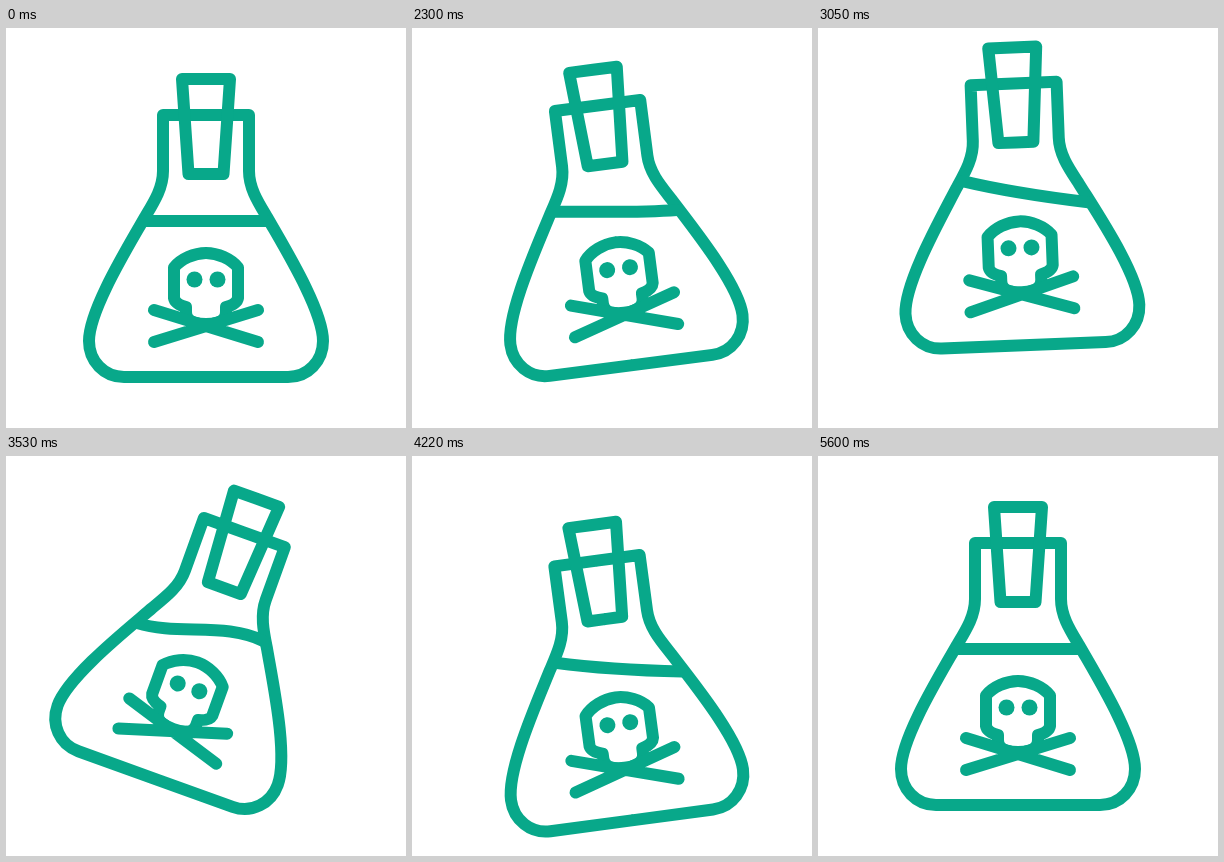
These frames come from a looping animation (400 px wide and 400 px high, 5.63 s). An HTML page with a canvas:

```html
<!DOCTYPE html>
<html lang="en">
<head>
<meta charset="utf-8">
<title>Poison flask</title>
<style>
  html, body { margin: 0; width: 100%; height: 100%; overflow: hidden; background: #fff; }
  canvas { display: block; }
</style>
</head>
<body>
<canvas id="stage" width="400" height="400"></canvas>
<script>
const ctx = document.getElementById('stage').getContext('2d');
const LOOP = 5630, REST = 2030, STEP = 30;
const COLOR = '#08a88a';

// Every shape is its left half plus the reflection about x = 200.
function mirrored(half) {
  const path = new Path2D(half);
  path.addPath(new Path2D(half), new DOMMatrix([-1, 0, 0, 1, 400, 0]));
  return path;
}

const flask = mirrored(`M200 87 H157 V143 C157 160 148 174 139 189
  C122 219 83 282 83 313 C83 333 98 349 118 349 H200`);
const cork = mirrored('M200 51 H176 L182.5 146 H200');
const skull = mirrored(`M200 225 C188 225 175 231 168 239.5 V270
  Q169 276 180 279 V284 Q180 292 188 294.5 Q194 296 200 296`);
const bones = mirrored('M148 282 L252 314');

function ease(t, from, to) {
  const s = Math.min(1, Math.max(0, (t - from) / (to - from)));
  return s * s * (3 - 2 * s);
}

// Degrees: wind up left, swing right, then rock back to rest.
function tilt(t) {
  return -16.2 * ease(t, 2000, 2640) + 36.9 * ease(t, 2640, 3620)
    - 29 * ease(t, 3620, 4280) + 12.2 * ease(t, 4280, 4860) - 3.9 * ease(t, 4860, 5430);
}

// Vertical offset: rise, hover, drop below rest and settle.
function lift(t) {
  return -31.6 * ease(t, 2000, 2780) + 48.4 * ease(t, 3160, 4180) - 16.8 * ease(t, 4180, 4900);
}

// Liquid slant from -1 to 1: one push each way, then a fading oscillation.
function slosh(t) {
  const push = ease(t, 2000, 2570) - 2 * ease(t, 3050, 3530);
  const ring = Math.cos(Math.PI * Math.max(0, t - 3530) / 690);
  return push * ring * (1 - ease(t, 4100, 5500));
}

function drawLiquid(t) {
  const s = slosh(t), bow = s * s;
  const level = 193 + 2.5 * bow;
  const yl = level - 13 * s, yr = level + 13 * s;
  // The ends slide along the sloping walls.
  const xl = 139 + 0.58 * (193 - yl), xr = 261 - 0.58 * (193 - yr);
  const dx = (xr - xl) / 3, dy = (yr - yl) / 3;
  ctx.beginPath();
  ctx.moveTo(xl, yl);
  ctx.bezierCurveTo(xl + dx, yl + dy + 5 * bow - 2 * s,
                    xr - dx, yr - dy - 6 * bow + 8 * s, xr, yr);
  ctx.stroke();
}

function drawEye(x) {
  ctx.beginPath();
  ctx.arc(x, 251.5, 8, 0, Math.PI * 2);
  ctx.fill();
}

function draw(t) {
  ctx.setTransform(1, 0, 0, 1, 0, 0);
  ctx.fillStyle = '#fff';
  ctx.fillRect(0, 0, 400, 400);
  ctx.translate(200, 200 + lift(t));
  ctx.rotate(tilt(t) * Math.PI / 180);
  ctx.translate(-200, -200);
  ctx.strokeStyle = ctx.fillStyle = COLOR;
  ctx.lineWidth = 12;
  ctx.lineCap = ctx.lineJoin = 'round';
  [flask, cork, skull, bones].forEach(path => ctx.stroke(path));
  drawLiquid(t);
  drawEye(188.5);
  drawEye(211.5);
}

function tick() {
  const t = performance.now() % LOOP;
  draw(t < REST ? 0 : REST + Math.floor((t - REST) / STEP) * STEP);
  requestAnimationFrame(tick);
}
tick();
</script>
</body>
</html>
```
